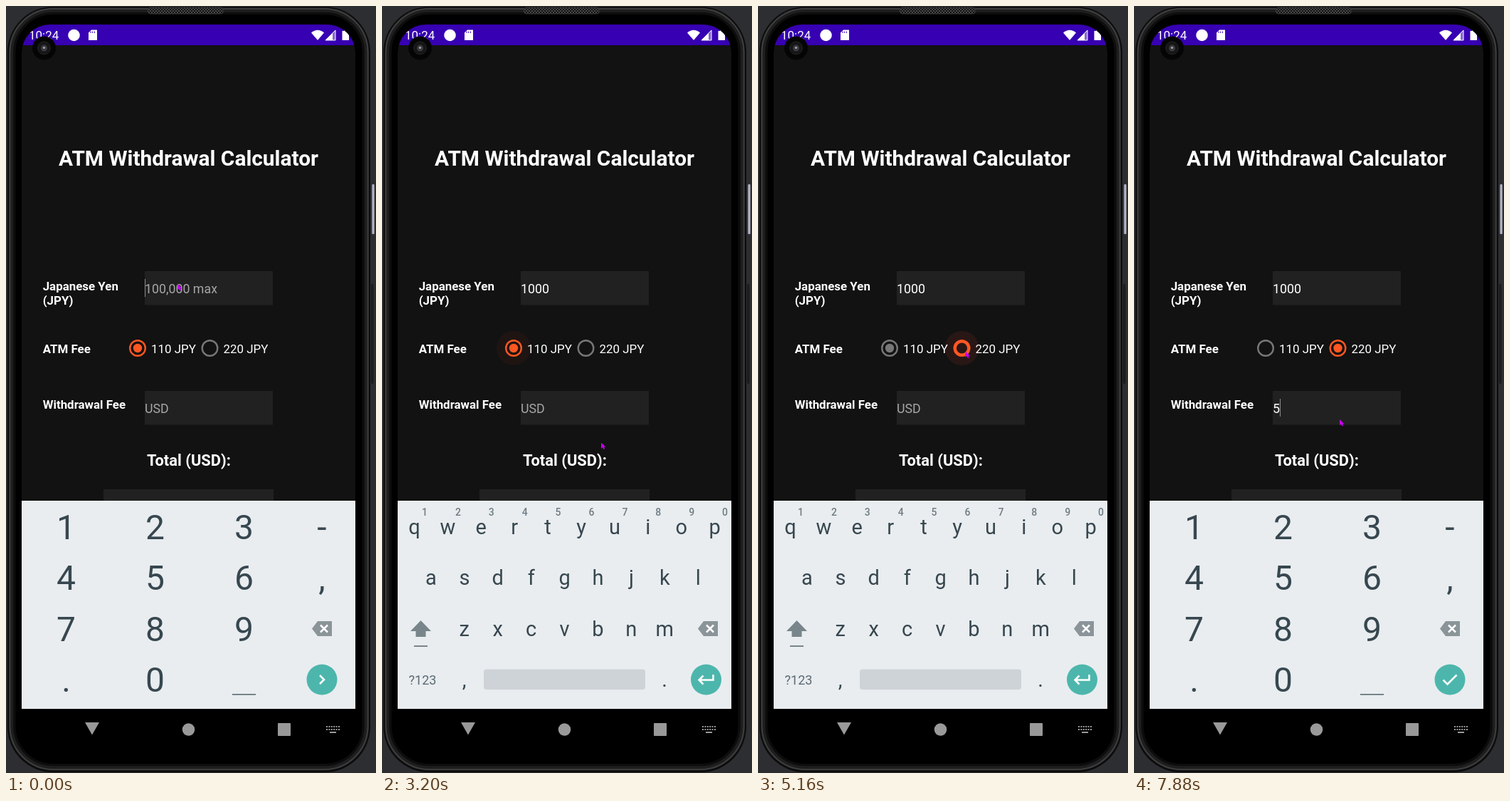
Animation of 520 by 1076 pixels, one loop 8 s. Source, as an HTML page:

```html
<!DOCTYPE html>
<html lang="en">
<head>
<meta charset="utf-8">
<title>ATM Withdrawal Calculator</title>
<style>
  html, body { margin: 0; width: 100%; height: 100%; overflow: hidden; background: #2d2e31; }
  svg { display: block; width: 100%; height: 100%; font-family: Roboto, sans-serif; }
  .bold { font-weight: 700; font-size: 16.9px; fill: #fff; }
  .field { fill: #212121; }
  .entry { font-size: 17.8px; }
  .option { font-size: 16.9px; fill: #fff; }
  .key { fill: #37474f; text-anchor: middle; }
  .digit { font-size: 48px; }
  .letter { font-size: 29px; }
  .hint { font-size: 14px; font-weight: 500; fill: #6f7b82; text-anchor: middle; }
  .icon { fill: none; stroke: #fff; stroke-width: 2.5; }
</style>
</head>
<body>
<svg viewBox="0 0 520 1076" preserveAspectRatio="none">
  <defs>
    <clipPath id="screen"><rect x="22" y="26" width="469" height="1030" rx="40"/></clipPath>
    <pattern id="mesh" width="4" height="4" patternUnits="userSpaceOnUse">
      <rect width="4" height="4" fill="#111"/>
      <circle cx="1" cy="1" r=".9" fill="#666"/><circle cx="3" cy="3" r=".9" fill="#666"/>
    </pattern>
    <linearGradient id="button"><stop stop-color="#77778a"/><stop offset=".6" stop-color="#c4c4d2"/><stop offset="1" stop-color="#66666f"/></linearGradient>
    <g id="erase">
      <path d="M-14 0L-6-10.5H14V10.5H-6Z" fill="#8a9499"/>
      <path d="M-2-5L8 5M8-5L-2 5" class="icon"/>
    </g>
  </defs>

  <!-- Phone body -->
  <rect width="520" height="1076" fill="#2d2e31"/>
  <rect x="514" y="250" width="4" height="70" rx="1.5" fill="url(#button)"/>
  <rect x="513" y="390" width="3.5" height="140" rx="1.5" fill="#1c1c1e"/>
  <g fill="#0c0c0c">
    <rect x="2" y="1" width="510" height="1074" rx="64"/>
    <rect x="5.5" y="4" width="503" height="1067" rx="61" stroke="#3c3c3d" stroke-width="2.5"/>
    <rect x="8.5" y="7" width="497" height="1061" rx="58" stroke="#1e1e1f" stroke-width="3.5"/>
    <rect x="12" y="10.5" width="490" height="1054" rx="54" fill="#000" stroke="#0d0d0d" stroke-width="3"/>
  </g>
  <rect x="199" y="2" width="107" height="9" rx="4.5" fill="url(#mesh)" stroke="#333"/>

  <g clip-path="url(#screen)">
    <rect x="22" y="26" width="469" height="960" fill="#121212"/>
    <rect x="22" y="26" width="469" height="29" fill="#3700b3"/>
    <text x="32" y="47" font-size="17" fill="#fff">10:24</text>
    <g fill="#fff">
      <circle cx="95.5" cy="41" r="8.3"/>
      <path d="M120 33.5H128V48H116V37.5Z"/>
      <path d="M429 37.5Q438 30 447 37.5L438 48Z"/>
      <path d="M449 48L463 34V48Z" opacity=".4"/>
      <path d="M449 48L459 38V48Z"/>
      <path d="M463 34V48H449Z" fill="none" stroke="#fff"/>
      <path d="M472.5 35H475V33H479V35H482V48H472.5Z"/>
    </g>
    <path d="M119 35.5V38M121.7 35.5V38M124.4 35.5V38" stroke="#3700b3"/>

    <text class="bold" x="256.5" y="224.3" text-anchor="middle" style="font-size:29.85px">ATM Withdrawal Calculator</text>
    <text class="bold" x="51.7" y="399">Japanese Yen</text>
    <text class="bold" x="51.7" y="419">(JPY)</text>
    <text class="bold" x="51.7" y="487">ATM Fee</text>
    <text class="bold" x="51.7" y="565">Withdrawal Fee</text>
    <text class="bold" x="257" y="644.5" text-anchor="middle" style="font-size:21.9px">Total (USD):</text>
    <rect class="field" x="195" y="372" width="180" height="47.5"/>
    <rect class="field" x="195" y="540" width="180" height="47.5"/>
    <rect class="field" x="137" y="678" width="239" height="48"/>
    <text class="entry" id="yen" x="195" y="403"></text>
    <text class="entry" id="fee" x="195" y="571"></text>
    <rect id="caret" width="1" height="25" fill="#8c8c8c"/>

    <circle id="focus" cx="185" cy="480" r="24" fill="#ff5722" opacity=".05"/>
    <circle id="ripple" cx="286.5" cy="480" r="24" fill="#f44336"/>
    <g id="radios" fill="none"></g>
    <text class="option" x="204" y="486.5">110 JPY</text>
    <text class="option" x="305.5" y="486.5">220 JPY</text>

    <rect x="22" y="694" width="469" height="292" fill="#e9edf0"/>
    <g id="keypad">
      <rect x="318" y="965" width="33" height="1.6" fill="#5d6a71"/>
      <use href="#erase" x="444" y="873.5"/>
      <circle cx="444" cy="945" r="21.5" fill="#4db6ac"/>
      <path id="next" class="icon" d="M441 939L447 945L441 951"/>
      <path id="done" class="icon" d="M434.5 945.5L440.5 951.5L453.5 938.5"/>
    </g>
    <g id="letters">
      <path d="M54.5 862L69 877H61.5V885H47.5V877H40Z" fill="#78858b"/>
      <rect x="45" y="897" width="19" height="2" fill="#78858b"/>
      <use href="#erase" x="458" y="873.5"/>
      <text class="key" x="57" y="952" style="font-size:18px;fill:#5c6a72">?123</text>
      <rect x="143" y="930.5" width="227" height="28.5" rx="4" fill="#ced3d7"/>
      <circle cx="455.5" cy="945" r="21.5" fill="#4db6ac"/>
      <path class="icon" d="M465.5 938V945.5H446M451.5 939.5L445.5 945.5L451.5 951.5"/>
    </g>

    <g fill="#999">
      <path d="M111 1005H131L121 1022.5Z"/>
      <circle cx="256.5" cy="1015" r="8.7"/>
      <rect x="382" y="1006" width="18" height="18" rx="1"/>
      <path d="M450 1011H469M450 1015H469" stroke="#999" stroke-width="2" stroke-dasharray="2 1.4"/>
      <path d="M455 1019H464" stroke="#999" stroke-width="2"/>
    </g>
  </g>

  <!-- Camera -->
  <circle cx="53.5" cy="59" r="16.5" fill="#050505"/>
  <circle cx="53.5" cy="59" r="9" fill="#161617" stroke="#222"/>
  <circle cx="53.5" cy="59" r="4.5" fill="#3a3b3e"/>
  <circle cx="53.5" cy="58.5" r="1.6" fill="#a5a7ac"/>

  <path id="pointer" d="M0 0V8.2L1.8 6.8L3.6 9.6L5 8.8L3.8 6.2H6.4Z" fill="#c800f5"/>
</svg>
<script>
const DURATION = 8000;
const el = id => document.getElementById(id);

function add(parent, tag, attrs, text = '') {
  const node = document.createElementNS('http://www.w3.org/2000/svg', tag);
  for (const name in attrs) node.setAttribute(name, attrs[name]);
  node.textContent = text;
  return parent.appendChild(node);
}

// Numeric keys
['123-', '456,', '789', '.0'].forEach((row, r) => [...row].forEach((label, c) =>
  add(el('keypad'), 'text', { class: 'key digit', x: c < 3 ? 84.5 + 125 * c : 444, y: 747.5 + 71.5 * r }, label)));

// Letter keys
const PITCH = 46.9;
[['qwertyuiop', 45.5], ['asdfghjkl', 69], ['zxcvbnm', 115.7]].forEach(([row, left], r) =>
  [...row].forEach((label, i) => {
    const x = left + PITCH * i;
    add(el('letters'), 'text', { class: 'key letter', x, y: 740.5 + 71.6 * r }, label);
    if (r === 0) add(el('letters'), 'text', { class: 'hint', x: x + 14.5, y: 715 }, (i + 1) % 10);
  }));
add(el('letters'), 'text', { class: 'key letter', x: 115.7, y: 955 }, ',');
add(el('letters'), 'text', { class: 'key letter', x: 397, y: 955 }, '.');

const radios = [185, 286.5].map(cx => ({
  ring: add(el('radios'), 'circle', { cx, cy: 480 }),
  dot: add(el('radios'), 'circle', { cx, cy: 480 })
}));

// Step tracks: [start time, value...]
const pointerTrack = [
  [0, 241, 390], [1870, 244, 388], [2030, 284, 500], [2150, 324, 633], [2270, 308, 612.5],
  [3320, 302, 578], [3440, 283, 520], [3560, 277, 499],
  [3710, 276, 486], [3840, 275, 478], [4230, 278, 478], [4770, 281, 477],
  [4910, 283, 478], [5035, 288, 481], [5160, 291.5, 484.5], [5280, 293, 503],
  [5400, 295, 535], [5530, 297, 562], [5650, 297, 572], [5960, 296, 572],
  [6240, 295, 570], [7210, 294, 569], [7480, 292, 568], [7760, 291, 574], [7880, 289, 580]
];
const yenTrack = [[0, ''], [560, '1'], [710, '10'], [1010, '100'], [1440, '1000']];
const feeTrack = [[0, ''], [7880, '5']];
const caretTrack = [[0, true], [280, false], [560, true], [2030, false], [2520, true],
  [2950, false], [6240, true], [6800, false], [7330, true], [7760, false], [7880, true]];
const rippleTrack = [[0, 0], [4090, .28], [5035, .2], [5160, .1], [5280, .04], [5400, 0]];
const boardTrack = [[0, 'next'], [3200, 'letters'], [6370, 'done']];
const stageTrack = [[0, 0], [5035, 1], [5160, 2], [5280, 3]];

const at = (track, t) => track.findLast(step => step[0] <= t).slice(1);
const show = (id, on) => { el(id).style.display = on ? '' : 'none'; };

function setEntry(id, value, hint) {
  el(id).textContent = value || hint;
  el(id).setAttribute('fill', value ? '#fff' : '#a6a6a6');
}

function setRadio({ ring, dot }, active, width, dotRadius) {
  const color = active ? '#ff5722' : '#777';
  ring.setAttribute('stroke', color);
  ring.setAttribute('stroke-width', width);
  ring.setAttribute('r', 12 - width / 2);
  dot.setAttribute('fill', color);
  dot.setAttribute('r', dotRadius);
}

function draw(t) {
  const [yen] = at(yenTrack, t), [fee] = at(feeTrack, t);
  const [board] = at(boardTrack, t), [stage] = at(stageTrack, t);
  setEntry('yen', yen, '100,000 max');
  setEntry('fee', fee, 'USD');

  const onFee = t >= 6240, typed = onFee ? fee : yen;
  show('caret', at(caretTrack, t)[0]);
  el('caret').setAttribute('x', Math.round(195 + typed.length * 9.99));
  el('caret').setAttribute('y', onFee ? 551 : 383);

  show('focus', t >= 3200 && t < 4090);
  el('ripple').setAttribute('opacity', at(rippleTrack, t)[0]);
  setRadio(radios[0], stage === 0, 2.4, [6.2, 6.2, 6.2, 0][stage]);
  setRadio(radios[1], stage > 0, [2.4, 3.2, 4.4, 2.4][stage], [0, 0, 0, 6.2][stage]);

  show('letters', board === 'letters');
  show('keypad', board !== 'letters');
  show('next', board === 'next');
  show('done', board === 'done');
  el('pointer').setAttribute('transform', `translate(${at(pointerTrack, t)})`);
}

const start = performance.now();
function tick() {
  draw((performance.now() - start) % DURATION);
  requestAnimationFrame(tick);
}
tick();
</script>
</body>
</html>
```
